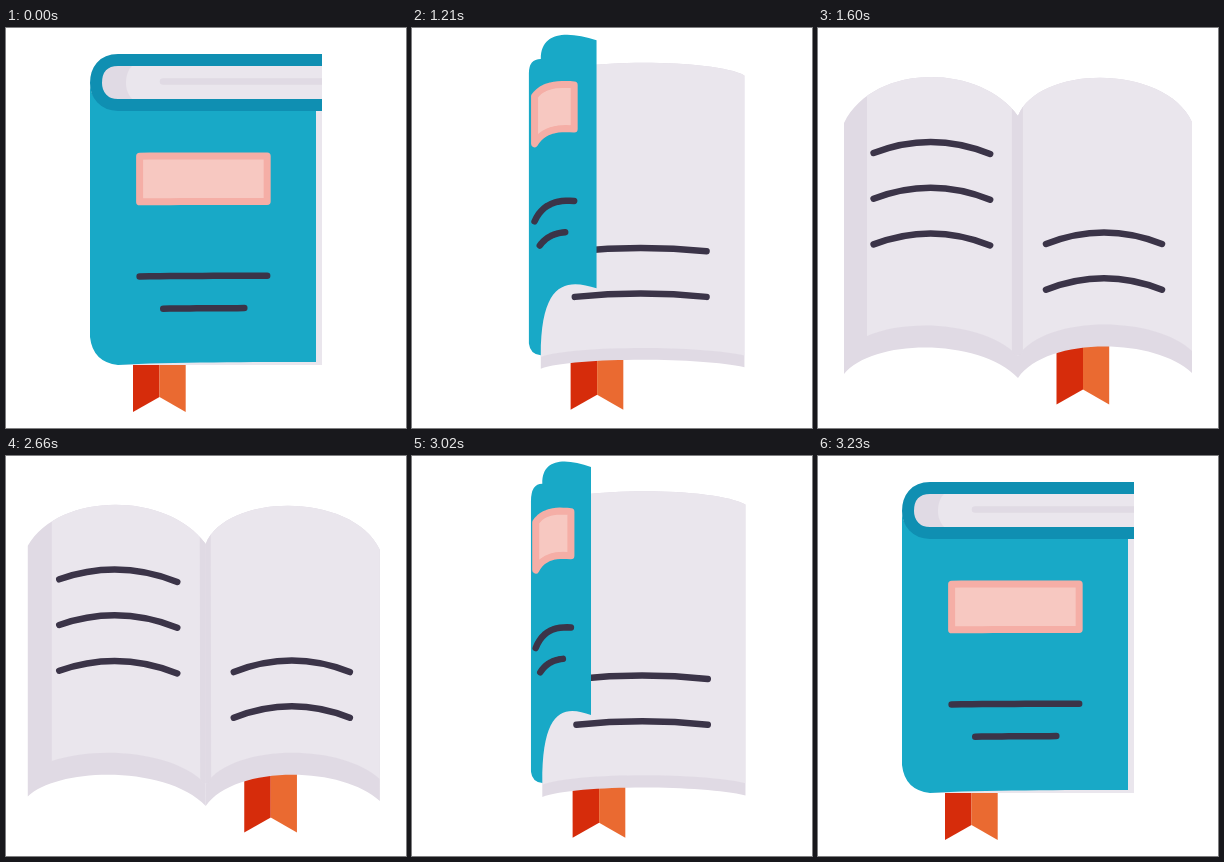
Recreate the animation shown at these times as an HTML page with a canvas. Size 400x400 px, loop 3.26 s.

```html
<!DOCTYPE html>
<html lang="en">
<head>
<meta charset="utf-8">
<title>Opening book</title>
<style>
  html, body { margin: 0; width: 100%; height: 100%; overflow: hidden; background: #fff; }
  canvas { display: block; width: 400px; height: 400px; }
</style>
</head>
<body>
<canvas id="stage" width="400" height="400"></canvas>
<script>
const ctx = document.getElementById('stage').getContext('2d');
const LOOP = 3260, STEP = 30, OPEN_AT = 1000, CLOSE_AT = 2630, STEPS = 20;
const FLIP = 0.47; // the cover is seen edge-on here
const color = {
  cover: '#18a9c7', band: '#0f8fb2', paper: '#eae6ed', shade: '#e0dae4',
  ink: '#3b3448', frame: '#f5aea6', label: '#f7c8c1', red: '#d62c0b', orange: '#ea6a31'
};

// Path of the turning cover's free edge.
const turn = [0, 0.0575, 0.37, 0.66, 0.8, 0.91, 1];
const edgePath = {
  x: [310, 291, 179, 20, 6, 14, 26],
  top: [77, 64, 11, 10, 46, 78, 95],
  bottom: [334, 325, 259, 265, 303, 329, 346]
};

const mix = (a, b, t) => a + (b - a) * t;

// Smooth curve through the key values.
function track(values, u) {
  const last = turn.length - 1;
  let i = 0;
  while (i < last - 1 && u > turn[i + 1]) i++;
  const span = turn[i + 1] - turn[i], s = (u - turn[i]) / span;
  const slope = k => {
    const a = Math.max(0, k - 1), b = Math.min(last, k + 1);
    return (values[b] - values[a]) / (turn[b] - turn[a]) * span;
  };
  return mix(values[i], values[i + 1], s * s * (3 - 2 * s))
    + slope(i) * s * (1 - s) ** 2 - slope(i + 1) * s * s * (1 - s);
}

// All measures of the book at one moment of the turn.
function bookAt(u) {
  const p = Math.sin(u * Math.PI / 2) ** 2;
  const spine = 84 + 116 * p, radius = Math.max(0, 28 - 45 * u);
  const top = track(edgePath.top, u);
  return {
    u, p, spine, radius, hinge: spine + radius,
    edge: { x: track(edgePath.x, u), top, bottom: track(edgePath.bottom, u) },
    lag: 95 - top, // how far the turning page still stands above its rest
    pageTop: 34 + 54 * p, pageBottom: 337 + 13 * p,
    rightX: 316 + 58 * p, strip: 22 * Math.sqrt(p),
    coverTop: 77 - 360 * u * u, coverBottom: 337 - 27 * u,
    bandWidth: 12 * Math.exp(-14 * u)
  };
}

// Cubic from a to b, with controls at shares of the width and given heights.
const arch = (a, b, share1, y1, share2, y2) =>
  [a, [mix(a[0], b[0], share1), y1], [mix(a[0], b[0], share2), y2], b];

function pointOn([a, b, c, d], t) {
  const s = 1 - t;
  return [0, 1].map(k =>
    s ** 3 * a[k] + 3 * s * s * t * b[k] + 3 * s * t * t * c[k] + t ** 3 * d[k]);
}

const curveTo = (path, [, b, c, d]) => path.bezierCurveTo(...b, ...c, ...d);

function sheet(top, bottom) {
  const path = new Path2D();
  path.moveTo(...top[0]);
  curveTo(path, top);
  path.lineTo(...bottom[3]);
  curveTo(path, [...bottom].reverse());
  path.closePath();
  return path;
}

function fill(path, style) {
  ctx.fillStyle = style;
  ctx.fill(path);
}

function stroke(path, style, width, cap = 'round') {
  ctx.strokeStyle = style;
  ctx.lineWidth = width;
  ctx.lineCap = cap;
  ctx.stroke(path);
}

function clipped(path, paint) {
  ctx.save();
  ctx.clip(path);
  paint();
  ctx.restore();
}

// Equal text lines below each other, each one bent in its middle.
function drawLines(count, x1, y1, x2, y2, bend) {
  for (let i = 0; i < count; i++) {
    const y = 45.7 * i, middle = (y1 + y2) / 2 + bend + y;
    stroke(new Path2D(`M${x1} ${y1 + y}Q${(x1 + x2) / 2} ${middle} ${x2} ${y2 + y}`), color.ink, 6.5);
  }
}

function drawRibbon({ p }) {
  const x = 127 + 111.5 * p, mid = x + 26.5, right = x + 52.7, y = 384 - 7.5 * p;
  fill(new Path2D(`M${x} 310H${mid}V${y - 15}L${x} ${y}Z`), color.red);
  fill(new Path2D(`M${mid} 310H${right}V${y}L${mid} ${y - 15}Z`), color.orange);
}

// A sheet with its thickness shown below and, from the left, up to faceX.
function drawSheet(path, faceX, { u, hinge, lag, strip }) {
  fill(path, color.shade);
  clipped(path, () => {
    const face = new Path2D();
    face.rect(faceX, 0, 400, 400);
    clipped(face, () => {
      ctx.translate(0, -strip);
      fill(path, color.paper);
    });
    if (u > FLIP) {
      stroke(new Path2D(`M${hinge - 0.6} 60L${hinge + 0.11 * lag - 0.6} 322`), color.shade, 11);
    }
  });
}

function drawRightPage(book) {
  const { p, spine, hinge, pageTop, pageBottom, rightX } = book;
  const topY = 28 + 8 * p, bottomY = 337 - 28 * p;
  const top = arch([hinge, pageTop], [rightX, 29 + 65 * p], 0.12, topY, 0.85, topY);
  const bottom = arch([hinge, pageBottom], [rightX, 337 + 8 * p], 0.16, bottomY, 0.78, bottomY);
  drawSheet(sheet(top, bottom), 0, book);
  const y = 226 - 10 * p;
  drawLines(2, spine + 53 - 25 * p, y, spine + 191 - 47 * p, y, -23 * p);
}

function drawLeftPage(book) {
  const { p, hinge, edge, lag, pageTop, pageBottom } = book;
  const side = (edgeY, hingeY, tilt) => arch([edge.x, edgeY], [hinge, hingeY],
    0.17, edgeY - 48 + 1.25 * lag + tilt, 0.78, edgeY - 48 + 0.83 * lag + tilt);
  const tilt = 12 * p * p;
  const path = sheet(side(edge.top, pageTop, -tilt), side(edge.bottom, pageBottom, tilt));
  drawSheet(path, edge.x + 23 + 0.2 * lag, book);
  drawLines(3, mix(edge.x, hinge, 0.17 + 0.0013 * lag), 125 - 0.32 * lag,
    mix(edge.x, hinge, 0.84), 126, -23 + 0.19 * lag);
}

// The page block seen from above, between the back and the front cover.
function bandPath({ spine, bandWidth, rightX, hinge, coverTop, edge }, front) {
  const half = bandWidth / 2, x = spine + half, y = 26 + half;
  const path = new Path2D(`M${rightX} ${y}H${spine + 28}C${spine + 13} ${y} ${x} 42 ${x} 55`
    + `C${x} 67 ${spine + 14} ${coverTop} ${hinge} ${coverTop}`);
  curveTo(path, front);
  path.lineTo(edge.x + half, edge.top);
  return path;
}

function drawBlock({ u, bandWidth, rightX }, path) {
  fill(path, color.shade);
  clipped(path, () => {
    ctx.translate(24 + bandWidth / 2, 0);
    fill(path, color.paper);
    ctx.translate(-24 - bandWidth / 2, 0);
    stroke(new Path2D(`M${157 + 260 * u} ${53.5 - 110 * u}H${rightX + 9}`), color.shade, 6.5);
  });
}

function drawCover(book) {
  const { u, spine, radius, hinge, edge, coverTop, coverBottom } = book;
  const lift = -9 * Math.min(1, 20 * u);
  const across = (x, y, edgeY) => arch([x, y], [edge.x, edgeY],
    0.25 - 0.7 * u, edgeY + lift, 0.7 - 0.6 * u, edgeY + lift);

  const top = across(hinge, coverTop, edge.top);
  const bottom = across(hinge, coverBottom, edge.bottom);
  const body = new Path2D(`M${spine} ${55 - 27 * u}Q${spine} ${coverTop} ${hinge} ${coverTop}`);
  curveTo(body, top);
  body.lineTo(edge.x, edge.bottom);
  curveTo(body, [...bottom].reverse());
  body.quadraticCurveTo(spine + radius * 0.1, coverBottom - radius * 0.1, spine, coverBottom - radius);

  const band = u < 0.15 && bandPath(book, top);
  if (band) drawBlock(book, band);
  fill(body, color.cover);
  if (band) stroke(band, color.band, book.bandWidth, 'butt');

  // Print follows the bent surface: t runs across it, v down.
  const upper = across(spine, coverTop, edge.top), lower = across(spine, coverBottom, edge.bottom);
  const addRow = (path, from, to, v) => {
    for (let i = 0; i <= 12; i++) {
      const t = mix(from, to, i / 12), a = pointOn(upper, t), b = pointOn(lower, t);
      path.lineTo(mix(a[0], b[0], v), mix(a[1], b[1], v));
    }
    return path;
  };
  const label = addRow(addRow(new Path2D(), 0.25, 0.78, 0.198), 0.78, 0.25, 0.375);
  label.closePath();
  fill(label, color.label);
  stroke(label, color.frame, 7);
  stroke(addRow(new Path2D(), 0.25, 0.78, 0.664), color.ink, 6.5);
  stroke(addRow(new Path2D(), 0.353, 0.685, 0.79), color.ink, 6.5);
}

// How far the book is open, 0 to 1, advancing in fixed steps.
function opening(t) {
  const closing = t >= CLOSE_AT;
  const n = Math.floor((t - (closing ? CLOSE_AT : OPEN_AT)) / STEP + 1e-6);
  if (n <= 0) return closing ? 1 : 0;
  if (n >= STEPS) return closing ? 0 : 1;
  return closing ? 1 - (n - 0.4) / STEPS : (n + 0.15) / STEPS;
}

function draw(t) {
  const book = bookAt(opening(t));
  ctx.clearRect(0, 0, 400, 400);
  ctx.lineJoin = 'round';
  drawRibbon(book);
  drawRightPage(book);
  if (book.u < FLIP) drawCover(book);
  else drawLeftPage(book);
}

const start = performance.now();
function tick() {
  draw((performance.now() - start) % LOOP);
  requestAnimationFrame(tick);
}
tick();
</script>
</body>
</html>
```
